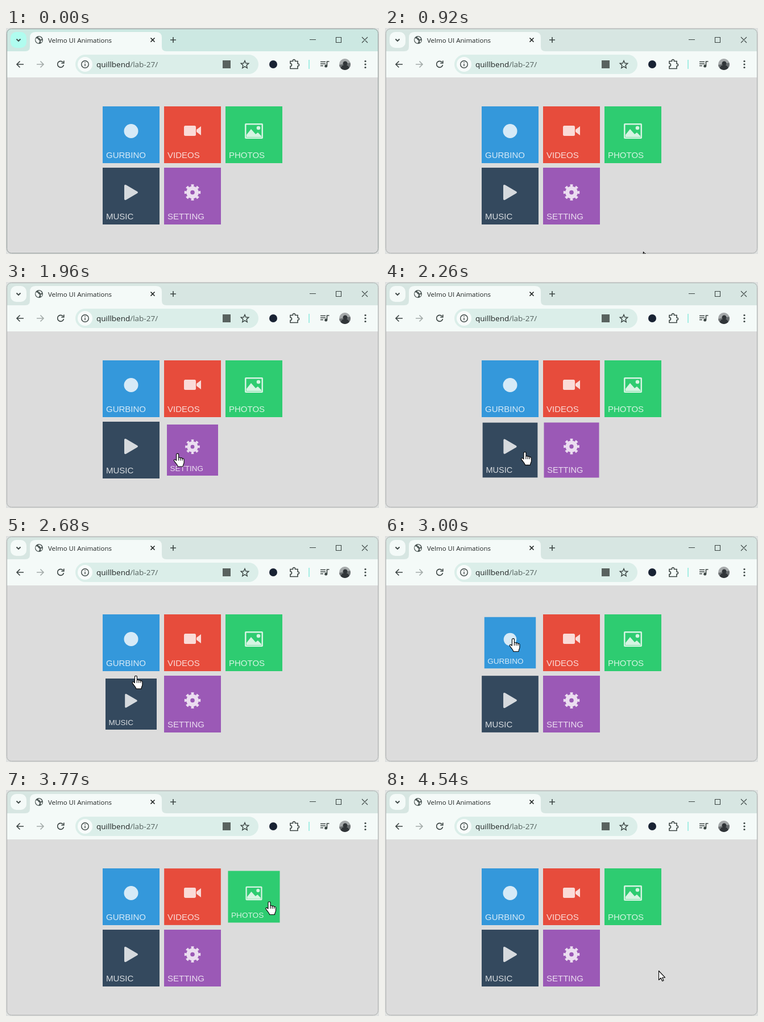
Animation of 656 by 398 pixels, one loop 5.5 s. Source, as an HTML page:

```html
<!DOCTYPE html>
<html lang="en">
<head>
<meta charset="utf-8">
<title>Tiles</title>
<style>
  html, body { margin: 0; width: 100%; height: 100%; overflow: hidden; background: #dfe1e0; }
  svg { display: block; width: 100%; height: 100%; }
  .focus { --strip: #cce8e2; --button: #b0fcef; --ctl: #1f2423; --edge: #909896; }
  .fade  { --strip: #d2e7e2; --button: #d3faf3; --ctl: #565d5b; --edge: #9fa4a2; }
  .blur  { --strip: #d7e6e2; --button: #f4faf8; --ctl: #8d9694; --edge: #acafae; }
  .strip { fill: var(--strip); }
  .button { fill: var(--button); }
  .ctl { stroke: var(--ctl); }
  .edge { stroke: var(--edge); }
  .line { fill: none; stroke-width: 1.6; stroke: #3c4644; }
  .ui { font-family: "Open Sans", "Noto Sans", sans-serif; }
  .tile text { font: 15px "Liberation Sans", Arial, sans-serif; }
  .tile g { fill: #fff; stroke: none; opacity: .8; }
  .cursor { fill: #fff; stroke: #000; stroke-width: 1.1; stroke-linejoin: round; }
</style>
</head>
<body>
<svg id="stage" class="focus" viewBox="0 0 656 398">
  <defs>
    <clipPath id="frame"><rect x="1" y="1" width="654" height="396" rx="8"/></clipPath>
    <clipPath id="face"><circle cx="596" cy="64" r="10"/></clipPath>
  </defs>

  <g clip-path="url(#frame)">
    <path class="strip" d="M0 0H656V42H0z"/>
    <path fill="#f4faf8" d="M0 41H34q8 0 8-8V17q0-10 10-10H264q10 0 10 10V33q0 8 8 8H656V87H0z"/>
    <path fill="#dcdcdc" d="M0 87H656V398H0z"/>
  </g>
  <rect class="edge" x="1.5" y="1.5" width="653" height="395" rx="8" fill="none"/>

  <!-- tab strip -->
  <rect class="button" x="8" y="7" width="28" height="28" rx="10"/>
  <path class="line ctl" d="M18.5 19.5l3.5 3.5 3.5-3.5" style="stroke-width:1.9"/>
  <circle cx="58" cy="21" r="7" fill="#4b5654"/>
  <path fill="#f4faf8" d="M53 18l3 1 1 2 2 1v2l-2 3q-5-2-5-7zM57 15.500l3 0 3 3-1 2-2-1-1-2-2 0zM61 22l3 0-2 4-1-2z"/>
  <text class="ui" x="74" y="25.500" font-size="11.5" fill="#1f2423">Velmo UI Animations</text>
  <path class="line" d="M254.500 17.500l7 7m0-7l-7 7" style="stroke:#1f2423"/>
  <path class="line ctl" d="M289 21h10m-5-5v10"/>
  <path class="line ctl" style="stroke-width:1.1" d="M534 20.500h11M580.500 16.500h9v9h-9zM626 16l10 10m0-10l-10 10"/>

  <!-- toolbar -->
  <path class="line" d="M31 64H19m5.500-5.500L19 64l5.500 5.500"/>
  <path class="line" style="stroke:#a3aba9" d="M54 64h12m-5.500-5.500L66 64l-5.500 5.500"/>
  <path class="line" d="M100.500 60.500A5.500 5.500 0 1 0 101.500 65M101.800 57.500v4.500h-4.500"/>
  <rect x="122" y="47" width="322" height="34" rx="17" fill="#dbeee9"/>
  <circle cx="139" cy="64" r="13" fill="#f8fcfb"/>
  <g class="line" style="stroke-width:1.4"><circle cx="139" cy="64" r="6.300"/><path d="M139 63v4.200m0-7.200v1.500"/></g>
  <text class="ui" x="159" y="69" font-size="13.5" fill="#1f2423">quillbend<tspan fill="#53605d">/lab-27/</tspan></text>
  <rect x="381" y="57" width="14" height="14" fill="#59625f"/>
  <path class="line" style="stroke-width:1.4" d="M420 57.500l1.900 4.500 4.900.4-3.700 3.200 1.100 4.800-4.200-2.600-4.200 2.600 1.100-4.800-3.700-3.200 4.900-.4z"/>
  <circle cx="470" cy="64" r="7" fill="#182233"/>
  <path class="line" d="M500 58.500h4.500v-1a2 2 0 0 1 4 0v1h4.500v4.500h.5a2 2 0 0 1 0 4h-.5v4.500h-13v-4a2.300 2.300 0 0 0 0-5z"/>
  <path d="M533 56v16" stroke="#a5eee4" stroke-width="2"/>
  <path class="line" d="M553 59.500h9M553 63h9M553 66.500h5M564.500 67v-8h4"/>
  <circle cx="562.700" cy="67" r="2.500" fill="#3c4644"/>
  <g clip-path="url(#face)">
    <path fill="#a5a9aa" d="M586 54h20v20h-20z"/>
    <path fill="#696e70" d="M586 65l20-4v13h-20z"/>
    <path fill="#303538" d="M588 74q1-8 6-8.500a4 4 0 1 1 5 0q5 1 5 8.500z"/>
  </g>
  <g fill="#3c4644"><circle cx="632" cy="58.500" r="1.600"/><circle cx="632" cy="64" r="1.600"/><circle cx="632" cy="69.500" r="1.600"/></g>

  <g id="tiles"></g>

  <path id="arrow" class="cursor" d="M.5.5V16.500L4.200 13 6.700 18.500 9 17.500 6.700 12.200H11.500z"/>
  <path id="hand" class="cursor" d="M-2 1.500C-2-1 2-1 2 1.500V8C2 6 5 6 5.300 8 6 6.500 8.300 7 8.500 9c1-1.200 3-.5 3 1.500V15c0 3-2 4-2 7.500H.5C.5 20-3 17-6 12.500-7 10.500-4.500 9-2 12zM2 8v4M5.300 8v4M8.500 9v3"/>
</svg>

<script>
const LOOP = 5500, FADE = 400;
const $ = id => document.getElementById(id);

// label, colour, column, row, hover start, hover end, icon
const tiles = [
  ['GURBINO', '#3498db', 0, 0, 2710, 3110, '<circle cx="50" cy="43.500" r="12.500"/>'],
  ['VIDEOS', '#e74c3c', 1, 0, 3140, 3460,
    '<rect x="35" y="34" width="21" height="18" rx="2.500"/><path d="M57 41l8-6v16l-8-6z"/>'],
  ['PHOTOS', '#2ecc71', 2, 0, 3525, 4080,
    '<path fill-rule="evenodd" d="M36 30h28q2 0 2 2v23q0 2-2 2H36q-2 0-2-2V32q0-2 2-2zm.5 2.500v22h27v-22z"/>' +
    '<circle cx="58" cy="38" r="3.300"/><path d="M37 54V50l8-10 8 9 4-3 6 6v2z"/>'],
  ['MUSIC', '#34495e', 0, 1, 2175, 2690,
    '<path d="M38 32q0-3 3-1.700l20 11.700q2 1.500 0 3L41 56.700q-3 1.300-3-1.700z"/>'],
  ['SETTING', '#9b59b6', 1, 1, 1500, 2095,
    '<g style="opacity:1;fill:none;stroke:#fff"><circle cx="50" cy="43.500" r="7.300" stroke-width="7"/>' +
    '<circle cx="50" cy="43.500" r="12" stroke-width="4.500" pathLength="16" stroke-dasharray="1" stroke-dashoffset=".5"/></g>']
];

// pointer path: time, x, y
const path = [
  [920, 454, 394], [1180, 424, 354], [1440, 391, 318], [1490, 379, 308], [1540, 369, 303],
  [1800, 330, 303], [2095, 278, 302], [2175, 268, 301], [2260, 246, 300], [2500, 236, 280],
  [2690, 228, 245], [2850, 226, 192], [3000, 225, 181], [3110, 270, 186], [3140, 278, 188],
  [3300, 335, 194], [3460, 379, 196], [3500, 385.500, 196], [3640, 430, 197], [3770, 463, 197],
  [3930, 465, 207], [4080, 470, 238], [4290, 480, 318], [4540, 481, 318]
];

$('tiles').innerHTML = tiles.map(([label, color, , , , , icon]) =>
  `<g class="tile"><rect width="100" height="100" fill="${color}"/><g>${icon}<text x="6" y="91">${label}</text></g></g>`
).join('');
const nodes = [...$('tiles').children];

// cubic-bezier(.25, .1, .25, 1)
function ease(p) {
  if (p <= 0) return 0;
  if (p >= 1) return 1;
  const bez = (a, b, u) => 3 * a * u * (1 - u) ** 2 + 3 * b * u * u * (1 - u) + u ** 3;
  let lo = 0, hi = 1;
  for (let i = 0; i < 20; i++) {
    const mid = (lo + hi) / 2;
    if (bez(.25, .25, mid) < p) lo = mid; else hi = mid;
  }
  return bez(.1, 1, lo);
}

function pointer(t) {
  const i = path.findIndex(k => k[0] > t);
  if (i < 0) return path[path.length - 1].slice(1);
  const [t0, x0, y0] = path[i - 1], [t1, x1, y1] = path[i];
  const p = (t - t0) / (t1 - t0);
  return [x0 + (x1 - x0) * p, y0 + (y1 - y0) * p];
}

function draw(t) {
  $('stage').setAttribute('class', t < 210 ? 'focus' : t < 270 ? 'fade' : 'blur');

  let hover = false;
  tiles.forEach(([, , col, row, start, end], i) => {
    const press = ease((Math.min(t, end) - start) / FADE) * (1 - ease((t - end) / FADE));
    const x = 220 + col * 108, y = 188 + row * 108;
    nodes[i].setAttribute('transform', `translate(${x} ${y}) scale(${1 - press / 10}) translate(-50 -50)`);
    if (t >= start && t < end) hover = true;
  });

  const shown = t >= path[0][0];
  $('arrow').style.display = shown && !hover ? '' : 'none';
  $('hand').style.display = shown && hover ? '' : 'none';
  if (shown) $(hover ? 'hand' : 'arrow').setAttribute('transform', `translate(${pointer(t)})`);
}

const begin = performance.now();
function tick() {
  draw((performance.now() - begin) % LOOP);
  requestAnimationFrame(tick);
}
tick();
</script>
</body>
</html>
```
